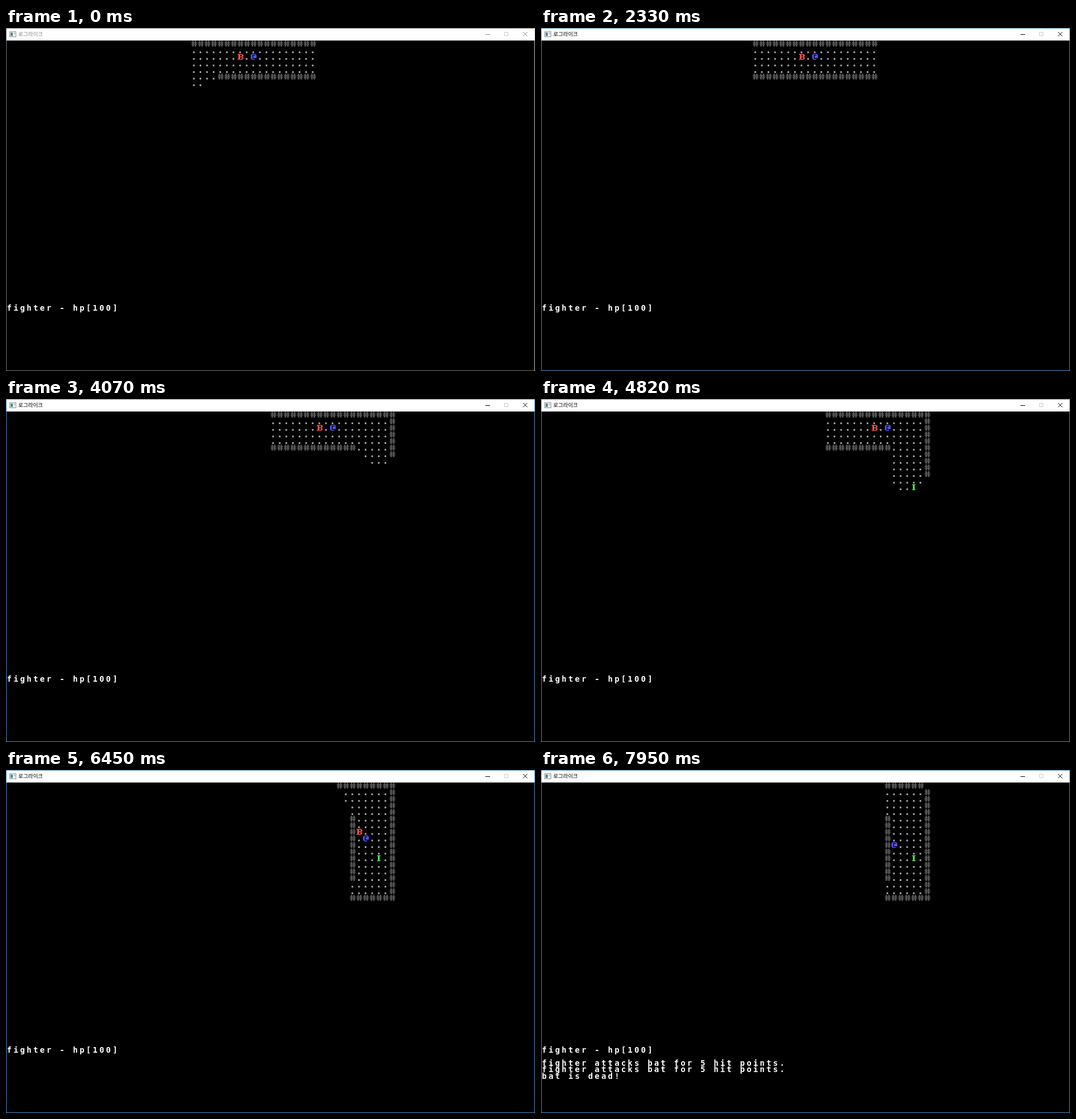
Animation of 929x603 px, one loop 8000 ms. Source, as an HTML page with a canvas:

```html
<!DOCTYPE html>
<html lang="ko">
<head>
<meta charset="utf-8">
<title>로그라이크</title>
<style>
html, body { margin: 0; width: 100%; height: 100%; overflow: hidden; background: #000; }
canvas { display: block; }
</style>
</head>
<body>
<canvas id="stage" width="929" height="603"></canvas>
<script>
const ctx = document.getElementById('stage').getContext('2d');
const W = 929, H = 603, LOOP = 8000, FOCUS_AT = 340;
const CELL = 11.6, PX = CELL / 8, LEFT = 0.7, TOP = 22.4, RADIUS = 10;

// Map glyphs as bars on an 8 by 8 cell: x, y, width, height
const GLYPHS = {
  '#': { color: '#555', bars: [[1, 0, 2, 7], [4, 0, 2, 7], [0, 2, 7, 1], [0, 4, 7, 1]] },
  '.': { color: '#aaa', bars: [[2, 5, 2, 2]] },
  '@': { color: '#55f', bars: [[1, 0, 5, 1], [0, 1, 2, 5], [5, 1, 2, 1], [3, 2, 4, 3], [1, 6, 4, 1]] },
  'B': { color: '#f55', bars: [[0, 0, 6, 1], [1, 1, 2, 5], [5, 1, 2, 2], [3, 3, 3, 1], [5, 4, 2, 2], [0, 6, 6, 1]] },
  'I': { color: '#5f5', bars: [[1, 0, 4, 1], [2, 1, 2, 5], [1, 6, 4, 1]] }
};

const ITEM = { x: 56, y: 11 };
const KEYS = 'R'.repeat(17) + 'D'.repeat(8) + 'LUUU';
const KEY_TIMES = [
  1200, 1830, 2060, 2330, 2560, 3060, 3185, 3310, 3580, 3700, 3820, 4070, 4320, 4450, 4820,
  4950, 5200, 5450, 5570, 5820, 6070, 6200, 6450, 6570, 6820, 7200, 7570, 7700, 7950
];
const DIRS = { R: [1, 0], L: [-1, 0], U: [0, -1], D: [0, 1] };

function isWall(x, y) {
  const hall = x <= 57 && (y >= 1 && y <= 4 || y >= 15 && y <= 16);
  const shaft = y >= 1 && y <= 16 && (x <= 31 || x >= 53 && x <= 57);
  return !(hall || shaft);
}

// Recursive shadowcasting over eight octants
function fieldOfView(cx, cy) {
  const lit = new Map();
  const light = (x, y) => lit.set(x + ',' + y, { x, y });

  function cast(row, start, end, xx, xy, yx, yy) {
    if (start < end) return;
    let next = start;
    for (let j = row; j <= RADIUS; j++) {
      let blocked = false;
      for (let dx = -j; dx <= 0; dx++) {
        const dy = -j;
        const l = (dx - 0.5) / (dy + 0.5), r = (dx + 0.5) / (dy - 0.5);
        if (start < r) continue;
        if (end > l) break;
        const x = cx + dx * xx + dy * xy, y = cy + dx * yx + dy * yy;
        if (dx * dx + dy * dy < RADIUS * RADIUS) light(x, y);
        const wall = isWall(x, y);
        if (blocked) {
          if (wall) {
            next = r;
          } else {
            blocked = false;
            start = next;
          }
        } else if (wall && j < RADIUS) {
          blocked = true;
          cast(j + 1, start, l, xx, xy, yx, yy);
          next = r;
        }
      }
      if (blocked) break;
    }
  }

  light(cx, cy);
  for (const a of [1, -1]) {
    for (const b of [1, -1]) {
      cast(1, 1, 0, a, 0, 0, b);
      cast(1, 1, 0, 0, a, b, 0);
    }
  }
  return [...lit.values()];
}

// Play all turns once and keep a snapshot of each
function playTurns() {
  const hero = { x: 37, y: 2 }, bat = { x: 35, y: 2, hp: 10 }, log = [];
  const turns = [];
  const save = time => turns.push({
    time, hero: { ...hero }, bat: { ...bat }, log: [...log], cells: fieldOfView(hero.x, hero.y)
  });
  save(0);
  KEY_TIMES.forEach((time, i) => {
    const [dx, dy] = DIRS[KEYS[i]];
    if (bat.hp > 0 && hero.x + dx === bat.x && hero.y + dy === bat.y) {
      bat.hp -= 5;
      log.push('fighter attacks bat for 5 hit points.');
      if (bat.hp <= 0) log.push('bat is dead!');
    } else {
      hero.x += dx;
      hero.y += dy;
    }
    const gapX = hero.x - bat.x, gapY = hero.y - bat.y, gap = Math.hypot(gapX, gapY);
    if (bat.hp > 0 && gap >= 2) {
      bat.x += Math.round(gapX / gap);
      bat.y += Math.round(gapY / gap);
    }
    save(time);
  });
  return turns;
}

function rect(color, x, y, w, h) {
  ctx.fillStyle = color;
  ctx.fillRect(x, y, w, h);
}

function drawGlyph(char, x, y) {
  const { color, bars } = GLYPHS[char];
  for (const [bx, by, w, h] of bars) {
    rect(color, LEFT + x * CELL + bx * PX, TOP + y * CELL + by * PX, w * PX, h * PX);
  }
}

function drawLine(text, row) {
  ctx.font = 'bold 14px "DejaVu Sans Mono", monospace';
  ctx.textAlign = 'center';
  ctx.fillStyle = '#fff';
  [...text].forEach((char, i) => {
    ctx.fillText(char, LEFT + i * CELL + 3.5 * PX, TOP + row * CELL + 7 * PX);
  });
}

function drawWindow(focused) {
  const ink = focused ? '#000' : '#888';
  rect('#fff', 0, 0, W, 22);

  rect('#8a9299', 6, 6, 12, 10);
  rect('#f4f4f4', 7, 7, 10, 8);
  rect('#4d8a86', 8, 8, 4, 6);
  rect('#b5bcc2', 14, 8, 2, 3);

  ctx.font = '9.4px "Noto Sans CJK KR", "Noto Sans CJK", sans-serif';
  ctx.textAlign = 'left';
  ctx.fillStyle = ink;
  ctx.fillText('로그라이크', 21.5, 14.2);

  rect(ink, 842, 11, 8, 1);
  ctx.lineWidth = 1;
  ctx.strokeStyle = '#ccc';
  ctx.strokeRect(875.5, 7.5, 6, 6);
  ctx.strokeStyle = ink;
  ctx.beginPath();
  ctx.moveTo(908, 7);
  ctx.lineTo(915.5, 14.5);
  ctx.moveTo(915.5, 7);
  ctx.lineTo(908, 14.5);
  ctx.stroke();

  ctx.strokeStyle = focused ? '#4a8cc4' : '#777';
  ctx.strokeRect(0.5, 0.5, W - 1, H - 1);
  if (!focused) rect('#ccc', W - 1, 0, 1, H);
}

const turns = playTurns();

function draw(time) {
  const { hero, bat, log, cells } = turns.findLast(turn => turn.time <= time);
  rect('#000', 0, 0, W, H);
  for (const { x, y } of cells) {
    const at = thing => thing.x === x && thing.y === y;
    const char = at(hero) ? '@' : at(bat) && bat.hp > 0 ? 'B' : at(ITEM) ? 'I' : isWall(x, y) ? '#' : '.';
    drawGlyph(char, x, y);
  }
  drawLine('fighter - hp[100]', 40);
  log.forEach((text, i) => drawLine(text, 42 + i));
  drawWindow(time >= FOCUS_AT);
}

let begin;
function tick(now) {
  begin ??= now;
  draw((now - begin) % LOOP);
  requestAnimationFrame(tick);
}
draw(0);
requestAnimationFrame(tick);
</script>
</body>
</html>
```
